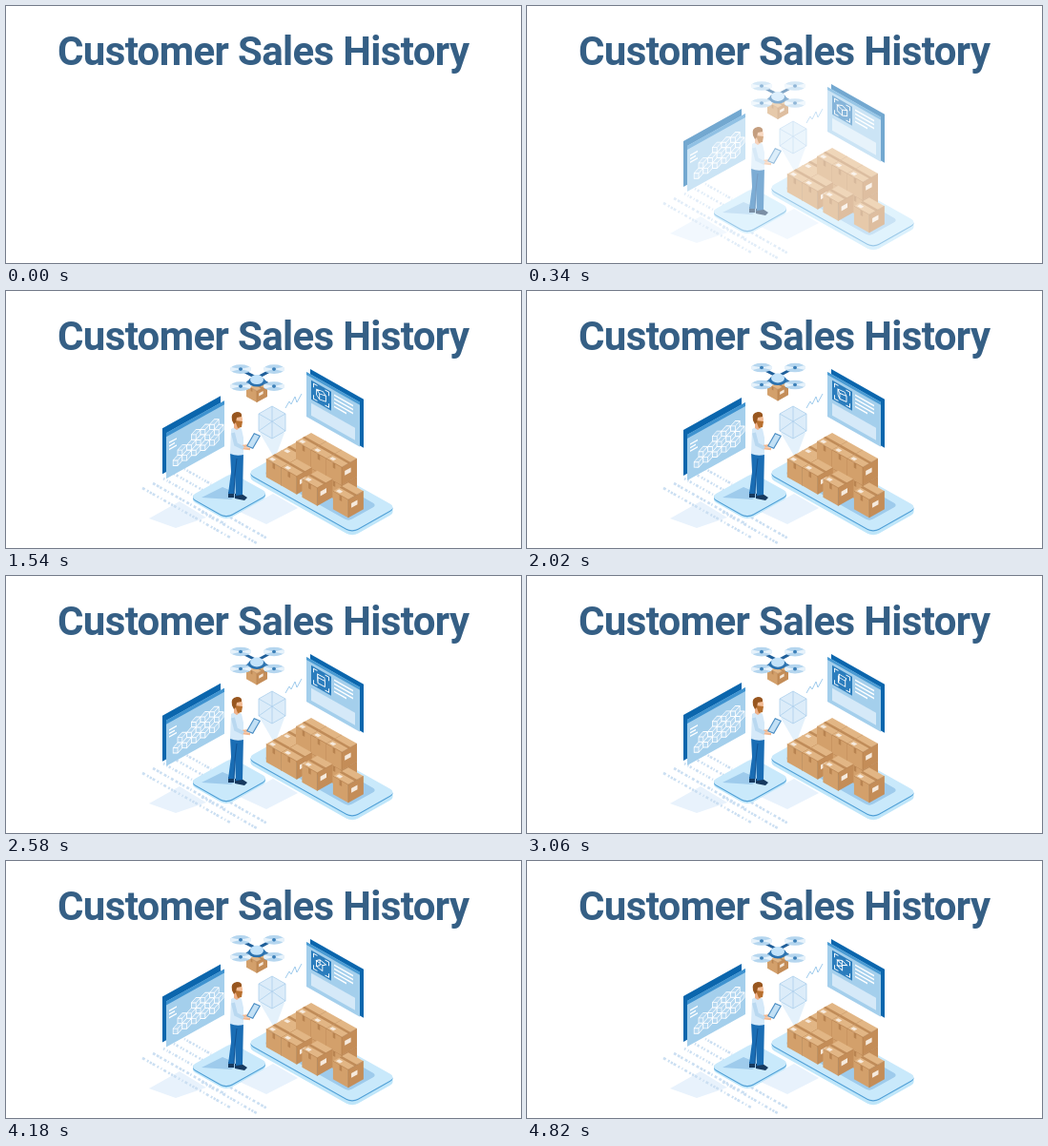
Write an HTML page with a canvas that moves like this. It is 540x270 px and loops after 4.9 s.

```html
<!DOCTYPE html>
<html lang="en">
<head>
<meta charset="utf-8">
<title>Customer Sales History</title>
<style>
  html, body { margin: 0; width: 100%; height: 100%; overflow: hidden; background: #fff; }
  canvas { display: block; }
</style>
</head>
<body>
<canvas id="stage" width="540" height="270"></canvas>
<script>
const ctx = document.getElementById("stage").getContext("2d");
const LOOP = 4900, START = 100, STEP = 80, FADE_END = 580;
const SLOPE = 0.565;
const SKY = "#a4cfec", NAVY = "#0b66ad", PALE = "#c9e9fb", SHADE = "#9ecbec";

// ---- drawing helpers ----
function fill(path, color) {
  ctx.fillStyle = color;
  ctx.fill(new Path2D(path));
}

function line(path, color = "#fff", width = 1) {
  ctx.strokeStyle = color;
  ctx.lineWidth = width;
  ctx.stroke(new Path2D(path));
}

function ellipse(x, y, rx, ry, color, from = 0, to = 2 * Math.PI) {
  ctx.fillStyle = color;
  ctx.beginPath();
  ctx.ellipse(x, y, rx, ry, 0, from, to);
  if (to - from < 6) ctx.lineTo(x, y);
  ctx.fill();
}

function rect(x, y, w, h, color, radius = 0) {
  ctx.fillStyle = color;
  ctx.beginPath();
  ctx.roundRect(x, y, w, h, radius);
  ctx.fill();
}

function within(matrix, paint) {
  ctx.save();
  ctx.transform(...matrix);
  paint();
  ctx.restore();
}

const shift = (dx, dy, paint) => within([1, 0, 0, 1, dx, dy], paint);
const wall = (x, y, slope, paint) => within([1, slope, 0, 1, x, y], paint);
const floor = (x, y, paint) => within([1, SLOPE, -1, SLOPE, x, y], paint);

function seeded(seed) {
  return () => (seed = (seed * 16807) % 2147483647) / 2147483647;
}

// ---- parts ----
function codeRows() {
  const random = seeded(11);
  for (let row = 0; row < 5; row++) {
    const x = 187 - 11 * row, y = 187 + 5 * row, length = 28 + 16 * row;
    ctx.setLineDash(Array.from({ length: 12 }, () => 1 + 2 * random()));
    line(`M${x} ${y}l${length} ${length * SLOPE}`, "#cbdff2", 2.6);
    if (row > 2) line(`M${x + 62} ${y + 25}l58 33`, "#cbdff2", 2.6);
  }
  ctx.setLineDash([]);
}

function slab(x, y, w, d, depth) {
  const layer = (dy, color) => floor(x, y + dy, () => rect(0, 0, w, d, color, 6));
  for (let dy = depth; dy > 1; dy--) layer(dy, "#bfe6fa");
  layer(1.3, "#4f9fd6");
  layer(0, PALE);
}

// Isometric cube whose lowest corner is (x, y).
function carton(x, y, w, h) {
  const rise = w * SLOPE;
  wall(x - w, y - rise - h, SLOPE, () => {
    rect(0, 0, w, h, "#d3a06b");
    rect(w * .42, 0, w * .16, h * .3, "#b98451");
  });
  wall(x, y - h, -SLOPE, () => {
    rect(0, 0, w, h, "#c48d58");
    rect(w * .2, h * .3, w * .4, h * .25, "#f6eadd");
  });
  floor(x, y - h - 2 * rise, () => {
    rect(0, 0, w, w, "#e2b685");
    rect(0, w * .42, w, w * .16, "#c08c59");
    rect(w * .1, w * .7, w * .25, w * .2, "#f6eadd");
  });
  line(`M${x} ${y}v${-h}l${-w} ${-rise}M${x} ${y - h}l${w} ${-rise}`, "#b27d4b", .6);
}

function stack() {
  const W = 16, H = 19;
  const place = (u, v, level = 0) =>
    carton(304 + W * (u - v), 196 + W * SLOPE * (u + v) - H * level, W, H);
  for (let u = 0; u < 4; u++) {
    place(u, 0);
    if (u) place(u, 0, 1);
  }
  for (const u of [0, 1, 2.35]) place(u, .95);
  place(4.05, .62);
}

function cubeIcon(angle) {
  const corner = (k, y) => {
    const a = angle + k * Math.PI / 2;
    return `${5.2 * Math.cos(a)} ${y + 2.3 * Math.sin(a)}`;
  };
  const ring = y => "M" + [0, 1, 2, 3].map(k => corner(k, y)).join("L") + "Z";
  line(ring(-3) + [0, 1, 2].map(k => `M${corner(k, -3)}L${corner(k, 3)}`).join("")
    + `M${corner(0, 3)}L${corner(1, 3)}L${corner(2, 3)}`, "#fff", .9);
}

function labelPanel(angle) {
  wall(319, 82, SLOPE, () => rect(0, 0, 56, 51, NAVY));
  wall(315, 85, SLOPE, () => {
    rect(0, 0, 56, 47, SKY);
    rect(0, 0, 56, 3, "#4a9bd3");
    rect(5, 30, 46, 13, "#d5e9f8");
    rect(5, 6, 21, 20, "#2b7dbd");
    for (let i = 0; i < 4; i++) rect(29, 7 + 4 * i, i < 3 ? 20 : 13, 1.7, "#fff");
    shift(15.5, 16, () => {
      for (const sx of [-1, 1]) for (const sy of [-1, 1])
        line(`M${8 * sx} ${4 * sy}v${4 * sy}h${-4 * sx}`, "#fff", .9);
      cubeIcon(angle);
    });
  });
}

function modelPanel() {
  wall(164, 142, -.557, () => rect(0, 0, 61, 48, NAVY));
  wall(168, 147, -.557, () => {
    rect(0, 0, 61, 48, SKY);
    rect(0, 0, 61, 4, "#3f93d0");
    for (let i = 0; i < 3; i++) rect(3, 11 + 3.6 * i, 8 - 2 * (i % 2), 1.5, "#fff");
    for (let row = 0; row < 3; row++) {
      for (let col = row ? 0 : 2; col < 5; col++) {
        const hex = `M${12 + 9.6 * col + 4.8 * (row % 2)} ${13.5 + 8.2 * row}`
          + "l4.8 2.7v5.6l-4.8 2.7l-4.8 -2.7v-5.6z";
        fill(hex, "#b4d7f0");
        line(hex + "m-4.8 2.7l4.8 2.8l4.8 -2.8m-4.8 2.8v5.4", "#fff", .8);
      }
    }
  });
}

function hologram() {
  fill("M266 149H292L283 173H280Z", "#e4f1fb");
  const hex = "M279 121l14 8v18l-14 8l-14 -8v-18z";
  fill(hex, "#dcecf9");
  line(hex + "m-14 8l14 8l14 -8m-14 8v18m0 -34v16l-14 10m14 -10l14 10", "#acd0ed", .8);
  line("M293 123l4 -7 2 3 4 -8 2 6 5 -9", "#9fcbed");
}

function worker() {
  fill("M233 211h6v6h-6ZM240 213h7l6 4-3 3-10-2Z", "#16395f");
  fill("M235 169h14l-1 45-7 1-1-22-1 20h-6l3-23Z", "#1a6db4");
  line("M242 176l-2 17-1 20", "#0f5294");
  fill("M236 145Q242 141 247 145L249 154V172Q242 174 235 171Z", "#d5e9f9");
  line("M248 163l9-1 5-4M248 165l8 1", "#f1b891", 2.6);
  line("M238 149l3 12 8 4", "#b9d8f0", 4);
  fill("M260 149l7 3-8 14-7-3Z", "#4a8dc4");
  fill("M260.500 150.500l5 2-7 12-5-2Z", "#c2e0f5");
  fill("M239 136h6v8l-3 2-3-2Z", "#eeb088");
  ellipse(244, 135, 4, 6, "#f3bd97");
  fill("M240 136l8 1-1 6-4 1Z", "#b9702f");
  fill("M237 136Q235 128 242 127 248 127 247 132L242 133 241 138 239 140Z", "#98561f");
}

function drone() {
  carton(263, 119, 11, 12);
  line("M247 85L280 102M280 84L247 102", "#1f5f9a", 3);
  line("M254 96v9M272 96v9", "#3f88c3", 1.5);
  for (const x of [246, 281]) for (const y of [84, 102]) {
    ellipse(x, y, 11, 4.8, "#b5d6ef");
    for (const a of [-.5, 2.6]) ellipse(x, y, 11, 4.8, "#e6f2fb", a, a + 1);
    ellipse(x, y, 2, 1.8, "#3b7fb8");
  }
  ellipse(263, 97, 9, 5.5, "#2a72b0");
  ellipse(263, 95, 7, 5, "#c3e3fa");
}

function scene(t) {
  fill("M150 239l32-18 28 17-32 11ZM245 232l35-19 26 15-33 17Z", "#e8f2fc");
  codeRows();
  slab(237, 191, 38.5, 44.5, 3);
  fill("M205 217l22-11 19 8-10 5Z", SHADE);
  slab(299, 165, 110, 46, 5);
  floor(299, 165, () => rect(9, 8, 89, 30, SHADE, 4));
  hologram();
  labelPanel(Math.PI / 2 * progress(t, FADE_END, LOOP));
  stack();
  shift(0, 4.8 * swing(t, 4540), modelPanel);
  worker();
  shift(0, -4.6 * swing(t, LOOP), drone);
}

// ---- timing ----
const progress = (t, from, to) => Math.min(1, Math.max(0, (t - from) / (to - from)));
const swing = (t, end) => Math.sin(Math.PI * progress(t, FADE_END, end)) ** 2;

function draw() {
  const time = performance.now() % LOOP;
  const t = time < START ? 0 : START + Math.floor((time - START) / STEP) * STEP;
  ctx.globalAlpha = 1;
  rect(0, 0, 540, 270, "#fff");
  scene(t);
  ctx.globalAlpha = 1 - progress(t, START - STEP, FADE_END);
  rect(0, 0, 540, 270, "#fff");
  ctx.globalAlpha = 1;
  ctx.font = "700 42px Roboto, sans-serif";
  ctx.letterSpacing = "-0.65px";
  ctx.fillStyle = "#355f85";
  ctx.fillText("Customer Sales History", 54, 62);
  requestAnimationFrame(draw);
}
draw();
</script>
</body>
</html>
```
